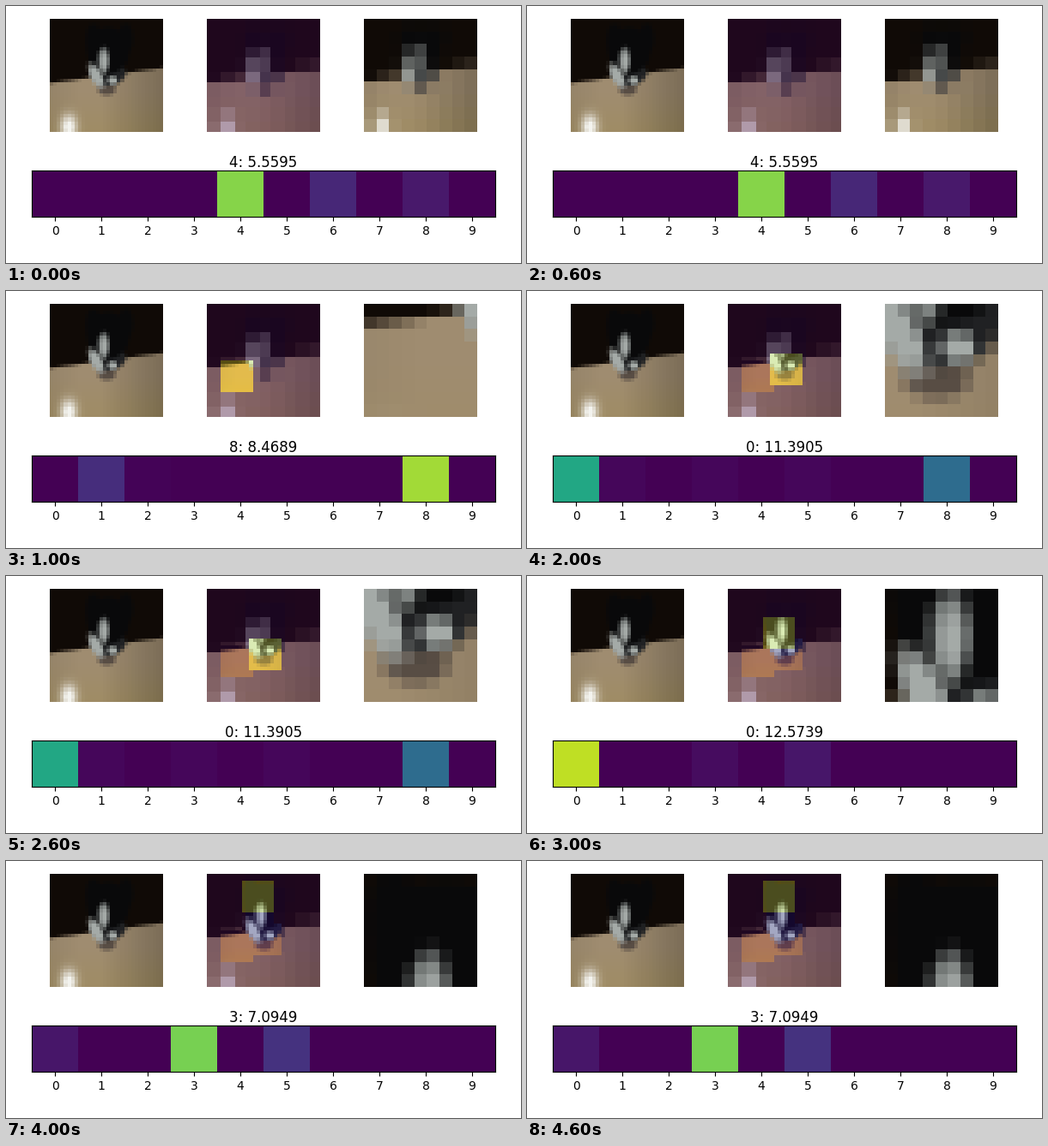
Animation of 600 by 300 pixels, one loop 5000 ms. Source, as a matplotlib script:

```python
import numpy as np
import matplotlib.pyplot as plt
from matplotlib.animation import FuncAnimation

SIZE, GLIMPSE = 32, 9
# glimpse corner (None: coarse overview), loss, digits by rank, top two shares
STEPS = [
    (None, 5.5595, "468", .82, .11),
    ((16, 4), 8.4689, "812", .86, .13),
    ((14, 12), 11.3905, "08135", .6, .352),
    ((8, 10), 12.5739, "053", .905, .06),
    ((2, 10), 7.0949, "350", .795, .145),
]

rows, cols = np.mgrid[:SIZE, :SIZE].astype(float)


def paint(img, color, alpha):
    alpha = np.clip(alpha, 0, 1)[..., None]
    return img * (1 - alpha) + np.asarray(color, float) * alpha


def blob(img, color, cx, cy, rx, ry, tilt=0):
    """Soft-edged ellipse, tilted by an angle in degrees."""
    c, s = np.cos(np.radians(tilt)), np.sin(np.radians(tilt))
    dx, dy = cols - cx, rows - cy
    dist = np.hypot((dx * c + dy * s) / rx, (dy * c - dx * s) / ry)
    return paint(img, color, (1 - dist) * min(rx, ry) + .5)


def make_photo():
    black, dark, white = (9, 9, 10), (32, 33, 35), (164, 170, 167)
    img = np.full((SIZE, SIZE, 3), (16, 10, 6), float)

    shade = 1 - .22 * np.clip((cols - 14) / 17, 0, 1) - .06 * np.clip(1 - cols / 8, 0, 1)
    table = shade[..., None] * (159, 140, 112)
    table[..., 2] -= np.clip(rows - 20, 0, None)
    img = paint(img, table, rows - (17.7 - .14 * cols) + .5)

    img = blob(img, (88, 77, 68), 15.6, 19.2, 2.6, 1.8)   # chin shadow
    for ear in (11.8, 21):
        img = blob(img, black, ear, 5, 2, 4)
    img = blob(img, dark, 16, 14.6, 4.8, 4)               # jaw
    img = blob(img, black, 16, 8.5, 6, 6.5)               # head
    img = blob(img, (90, 94, 93), 14.7, 11.2, 1.8, 3.5)   # blaze
    img = blob(img, white, 14.7, 11.5, 1, 2.8)
    img = blob(img, white, 12.6, 15.7, 1.5, 3.7, -26)     # cheeks
    img = blob(img, white, 17.3, 17, 1.3, 1.2)

    glare = np.exp(-((cols - 4.9) / 2.2) ** 2 - ((rows - 30) / 3.2) ** 2)
    return paint(img, (243, 243, 239), 1.1 * glare)


def enhance(img):
    """Brighter highlights, stronger colour and a cool cast."""
    light = img.mean(axis=2, keepdims=True)
    out = 1.15 * light + 2 * np.clip(light - 150, 0, None)
    return np.clip(out + 3.2 * (img - light) + (-12, 2, 16), 0, 255)


photo = make_photo()
vivid = enhance(photo)
bins = np.arange(SIZE) * GLIMPSE // SIZE
pool = np.eye(GLIMPSE)[bins].T
pool /= pool.sum(axis=1, keepdims=True) if False else pool.sum(axis=1)[:, None]
coarse = np.einsum("ir,rck,jc->ijk", pool, photo, pool)


def window(corner):
    return tuple(slice(k, k + GLIMPSE) for k in corner)


def state(step):
    """Canvas, highlight mask and current view after the given step."""
    canvas, mask, view = coarse[bins][:, bins], np.zeros((SIZE, SIZE)), coarse
    for corner, *_ in STEPS[1:step + 1]:
        area = window(corner)
        canvas[area] = vivid[area]
        mask[:] = 0
        mask[area] = 1
        view = photo[area]
    return canvas, mask, view


def shares(digits, first, second):
    """The remaining probability is spread evenly over the later digits."""
    rest = digits[2:]
    values = np.zeros((1, 10))
    for digit, p in zip(digits, [first, second] + [(1 - first - second) / len(rest)] * len(rest)):
        values[0, int(digit)] = p
    return values


def to_rgb(img):
    return np.round(img).astype(np.uint8)


fig = plt.figure(figsize=(6, 3), dpi=100, facecolor="white")
grid = fig.add_gridspec(2, 3, left=.05, right=.95, bottom=.05, top=.95,
                        wspace=.05, hspace=.05)
panels = [fig.add_subplot(grid[0, k]) for k in range(3)]
for ax in panels:
    ax.axis("off")

viridis = dict(cmap="viridis", vmin=0, vmax=1, interpolation="nearest")
canvas, mask, view = state(0)
panels[0].imshow(to_rgb(photo), interpolation="nearest")
canvas_im = panels[1].imshow(to_rgb(canvas), interpolation="nearest")
mask_im = panels[1].imshow(mask, alpha=.3, **viridis)
view_im = panels[2].imshow(to_rgb(view), interpolation="nearest")

bar = fig.add_subplot(grid[1, :])
bar_im = bar.imshow(np.zeros((1, 10)), **viridis)
bar.set_xticks(range(10))
bar.set_yticks([])
title = bar.set_title("", fontsize=12, pad=1)


def update(step):
    canvas, mask, view = state(step)
    _, loss, digits, first, second = STEPS[step]
    canvas_im.set_data(to_rgb(canvas))
    mask_im.set_data(mask)
    view_im.set_data(to_rgb(view))
    bar_im.set_data(shares(digits, first, second))
    title.set_text(f"{digits[0]}: {loss:.4f}")
    return canvas_im, mask_im, view_im, bar_im, title


anim = FuncAnimation(fig, update, frames=len(STEPS), interval=1000, repeat=True)
plt.show()
```
